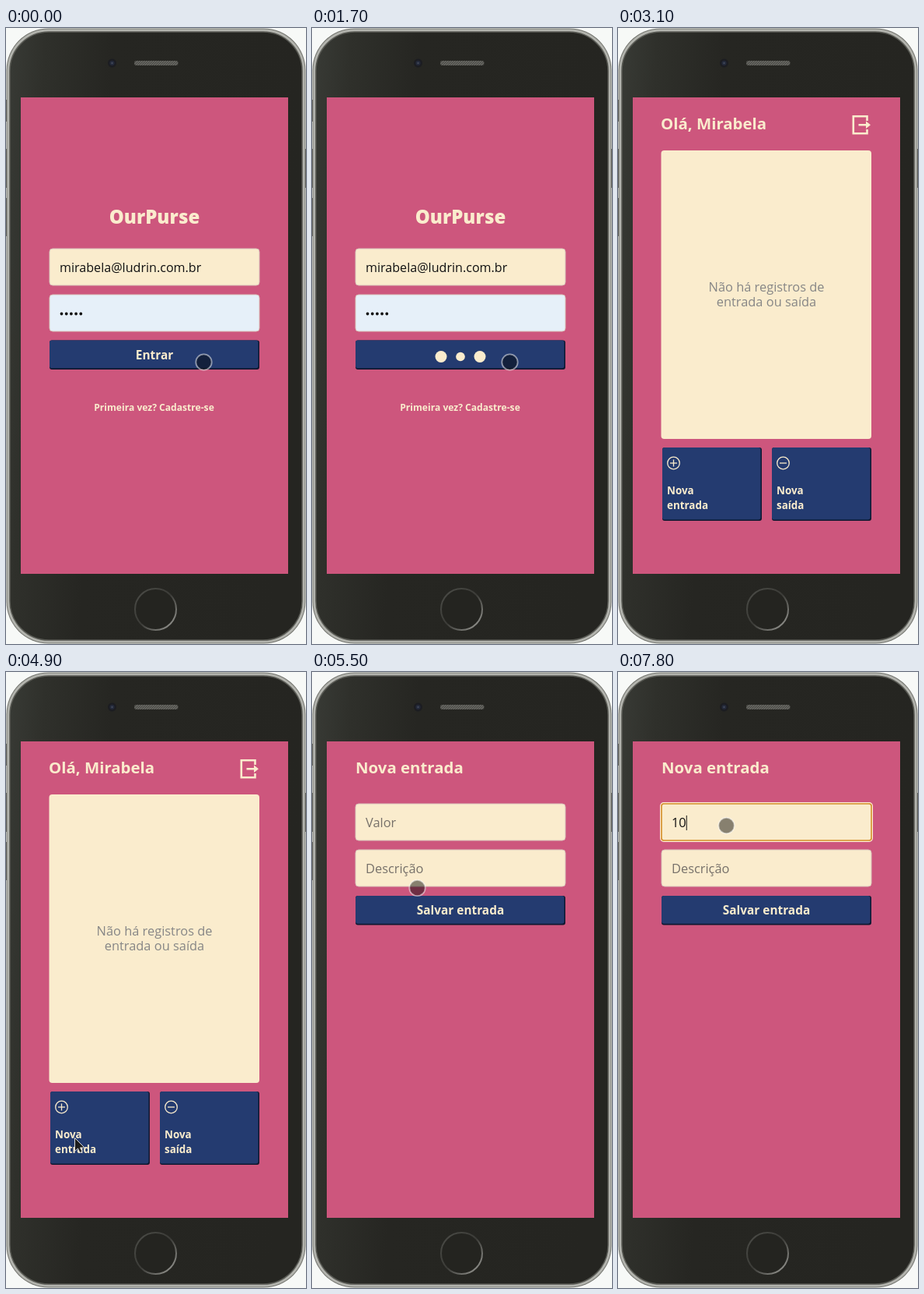
An HTML page for the animation above (8000 ms loop, 386 by 790 pixels).

```html
<!DOCTYPE html>
<html lang="pt-BR">
<head>
<meta charset="utf-8">
<title>Carteira</title>
<style>
  html, body { margin: 0; width: 100%; height: 100%; overflow: hidden; background: #f7f9f7; }
  svg { display: block; width: 100%; height: 100%; font: 16.4px "Open Sans", sans-serif; }
  .cream { fill: #faeccd; }
  .bold { font-weight: 700; fill: #faeccd; }
  .heading { font-size: 20.4px; }
  .action { font-size: 15.4px; text-anchor: middle; }
  .small { font-size: 13.4px; }
  .muted { fill: #868686; }
  .placeholder { fill: #77716a; }
  .middle { text-anchor: middle; }
  .field { stroke: #d9c3bb; }
  .line { fill: none; stroke: #faeccd; }
</style>
</head>
<body>
<svg viewBox="0 0 386 790">
  <defs>
    <linearGradient id="body" x2="1" y2=".12">
      <stop offset="0" stop-color="#383a35"/>
      <stop offset=".12" stop-color="#2f302b"/>
      <stop offset=".35" stop-color="#262622"/>
      <stop offset="1" stop-color="#252521"/>
    </linearGradient>
    <linearGradient id="homeRing" x2="1" y2="1">
      <stop offset="0" stop-color="#4c4d48"/>
      <stop offset=".5" stop-color="#3b3b37"/>
      <stop offset="1" stop-color="#a3a39e"/>
    </linearGradient>
    <pattern id="mesh" width="3" height="3" patternUnits="userSpaceOnUse">
      <rect width="3" height="3" fill="#666661"/>
      <path d="M0 3L3 0" stroke="#454541"/>
    </pattern>
    <g id="navyButton">
      <path d="M2 37H268Q270 37 270 35V2" fill="none" stroke="#101a36" stroke-width="2"/>
    </g>
    <g id="tile">
      <rect width="128" height="94" rx="3" fill="#10182f"/>
      <rect width="126.5" height="92.5" rx="3" fill="#243b70"/>
      <circle cx="14.5" cy="20" r="7.8" class="line" stroke-width="1.3"/>
      <path d="M10 20H19" class="line" stroke-width="1.3"/>
    </g>
    <g id="wideButton">
      <rect width="270" height="37.5" rx="3" fill="#0f1830"/>
      <rect width="268.5" height="35.7" rx="3" fill="#243b70"/>
    </g>
  </defs>

  <!-- Phone -->
  <path d="M.5 92V120M.5 155V205M.5 218V267M385.5 155V205" stroke="#4a4b47" stroke-width="2"/>
  <rect x=".5" y=".5" width="385" height="789" rx="54" fill="#73746e"/>
  <rect x="1.5" y="1.5" width="383" height="787" rx="53" fill="#b3b4ae"/>
  <rect x="5" y="5" width="376" height="780" rx="50" fill="url(#body)" stroke="#595a54" stroke-width="1.5"/>
  <circle cx="136.5" cy="45" r="5.5" fill="#1c1d22"/>
  <circle cx="136.5" cy="45" r="3" fill="#252b3c"/>
  <circle cx="136.5" cy="45" r="1" fill="#4c5261"/>
  <rect x="165" y="42" width="56.5" height="6" rx="3" fill="url(#mesh)"/>
  <circle cx="192.5" cy="745.5" r="26.5" fill="#242420" stroke="url(#homeRing)" stroke-width="2"/>
  <rect x="19" y="89" width="344" height="611" fill="#cd567d"/>

  <g id="login">
    <text x="191" y="251" class="cream middle" font-size="24" font-weight="800">OurPurse</text>
    <rect x="56" y="283" width="270" height="47" rx="4" class="cream field"/>
    <text x="69" y="313" fill="#111" font-size="16.1">mirabela@ludrin.com.br</text>
    <rect x="56" y="342" width="270" height="47" rx="4" fill="#e6f0f9" class="field"/>
    <path d="M71.5 366.5H97" stroke="#111" stroke-width="3.8" stroke-linecap="round" stroke-dasharray="0 6.2"/>
    <use href="#wideButton" x="56" y="400.5"/>
    <text id="enter" x="191" y="425" class="bold action">Entrar</text>
    <g id="loader" class="cream">
      <circle cx="166" cy="421.5"/><circle cx="191" cy="421.5"/><circle cx="216" cy="421.5"/>
    </g>
    <text x="190.5" y="491" class="bold middle" font-size="12.1">Primeira vez? Cadastre-se</text>
  </g>

  <g id="home">
    <text id="greeting" x="55" y="130" class="bold heading">Olá, Mirabela</text>
    <g id="exit">
      <path d="M79 119V113.3H61.3V135.3H79V130" class="line" stroke-width="2.6"/>
      <path d="M68 123.1H77.5V119.5L83.5 124.3 77.5 129.1V125.5H68Z" class="cream"/>
    </g>
    <rect x="55.5" y="157" width="270.5" height="370" rx="4" class="cream"/>
    <g class="muted middle">
      <text x="191" y="338">Não há registros de</text>
      <text x="191" y="357">entrada ou saída</text>
    </g>
    <use href="#tile" x="57" y="538"/>
    <path d="M71.5 553.5V562.5" class="line" stroke-width="1.3"/>
    <use href="#tile" x="198" y="538"/>
    <g class="bold small">
      <text x="63" y="598">Nova</text><text x="63" y="617">entrada</text>
      <text x="204" y="598">Nova</text><text x="204" y="617">saída</text>
    </g>
  </g>

  <g id="form">
    <text x="56" y="130" class="bold heading">Nova entrada</text>
    <rect x="56" y="169" width="270" height="47" rx="4" class="cream field"/>
    <g id="focus" fill="none">
      <rect x="54.7" y="167.7" width="272.6" height="49.6" rx="4" stroke="#fff0d8" stroke-width="1.4"/>
      <rect x="56" y="169" width="270" height="47" rx="3" stroke="#d9982c" stroke-width="1.6"/>
    </g>
    <text id="amount" x="69" y="199"></text>
    <path id="caret" d="M0 184V203" stroke="#111"/>
    <rect x="56" y="228" width="270" height="47" rx="4" class="cream field"/>
    <text x="69" y="258" class="placeholder">Descrição</text>
    <use href="#wideButton" x="56" y="287"/>
    <text x="191" y="311" class="bold action">Salvar entrada</text>
  </g>

  <g id="status">
    <path d="M19 678H128Q131 678 131 681V700H19Z" fill="#a4a8b2"/>
    <text x="24" y="694" fill="#26282c" font-family="Noto Sans, sans-serif" font-size="15.1">Aguardando…</text>
  </g>

  <circle id="touch" r="10.2" stroke="#fff" stroke-opacity=".5" stroke-width="1.8"/>
  <path id="arrow" d="M88.5 597.5V614.5L92.5 611 95 616.5 98 615 95.5 610H101Z" fill="#1d1d1d" stroke="#d8d8d8"/>
</svg>

<script>
const LOOP = 8000, STEP = 100;
const $ = id => document.getElementById(id);
const show = (id, on) => { $(id).style.display = on ? '' : 'none'; };
const within = (t, from, to) => t >= from && t < to;

// Pointer stops: time, x, y
const stops = [
  [3900, 215, 580], [4000, 174, 593], [4200, 104, 620], [4300, 104, 620],
  [4500, 82, 606], [4700, 82, 606], [4800, 88, 606], [5200, 92, 606],
  [5500, 135.5, 277], [5700, 139, 214], [5900, 139.5, 197]
];

function pointerAt(t) {
  if (t < 2500) return [254.5, 428.5];
  if (t < 3100) {
    const p = (t - 2400) / 700, q = 1 - p;
    const curve = (a, b, c) => a * q * q + 2 * b * p * q + c * p * p;
    return [curve(254.5, 110, 390), curve(428.5, 340, 233)];
  }
  const next = stops.findIndex(s => s[0] > t);
  if (next < 0) return stops[stops.length - 1].slice(1);
  if (next === 0) return stops[0].slice(1);
  const [t0, x0, y0] = stops[next - 1], [t1, x1, y1] = stops[next];
  const p = (t - t0) / (t1 - t0);
  return [x0 + (x1 - x0) * p, y0 + (y1 - y0) * p];
}

function drawLoader(t) {
  const phase = (Math.min(t, 1700) - 800) / 800 % 1;
  const wave = 1 - Math.abs(2 * phase - 1);
  [...$('loader').children].forEach((dot, i) => {
    dot.setAttribute('r', 5 + 10 / 3 * (i === 1 ? wave : 1 - wave));
  });
}

function render(t) {
  show('login', t < 2000);
  show('home', within(t, 2000, 5000));
  show('form', t >= 5000);
  show('status', within(t, 2000, 2300) || within(t, 5000, 5300));

  show('enter', t < 900);
  show('loader', t >= 900);
  drawLoader(t);

  const greeted = t >= 2300;
  show('greeting', greeted);
  $('exit').setAttribute('transform', `translate(${greeted ? 241.5 : 0})`);

  const typed = t < 7500 ? '' : t < 7800 ? '1' : '10';
  const amount = $('amount');
  amount.textContent = typed || 'Valor';
  amount.setAttribute('fill', typed ? '#111' : '#77716a');
  show('focus', t >= 6300);
  show('caret', typed);
  if (typed) {
    const end = 69.5 + amount.getComputedTextLength();
    $('caret').setAttribute('transform', `translate(${end})`);
  }

  const arrow = within(t, 4900, 5000);
  show('arrow', arrow);
  show('touch', !arrow && !within(t, 3100, 4000));
  $('touch').setAttribute('transform', `translate(${pointerAt(t)})`);
  $('touch').setAttribute('fill-opacity', within(t, 6300, 6700) ? .6 : .46);
}

function tick() {
  const t = performance.now() % LOOP;
  render(Math.floor(t / STEP) * STEP);
  requestAnimationFrame(tick);
}
tick();
</script>
</body>
</html>
```
